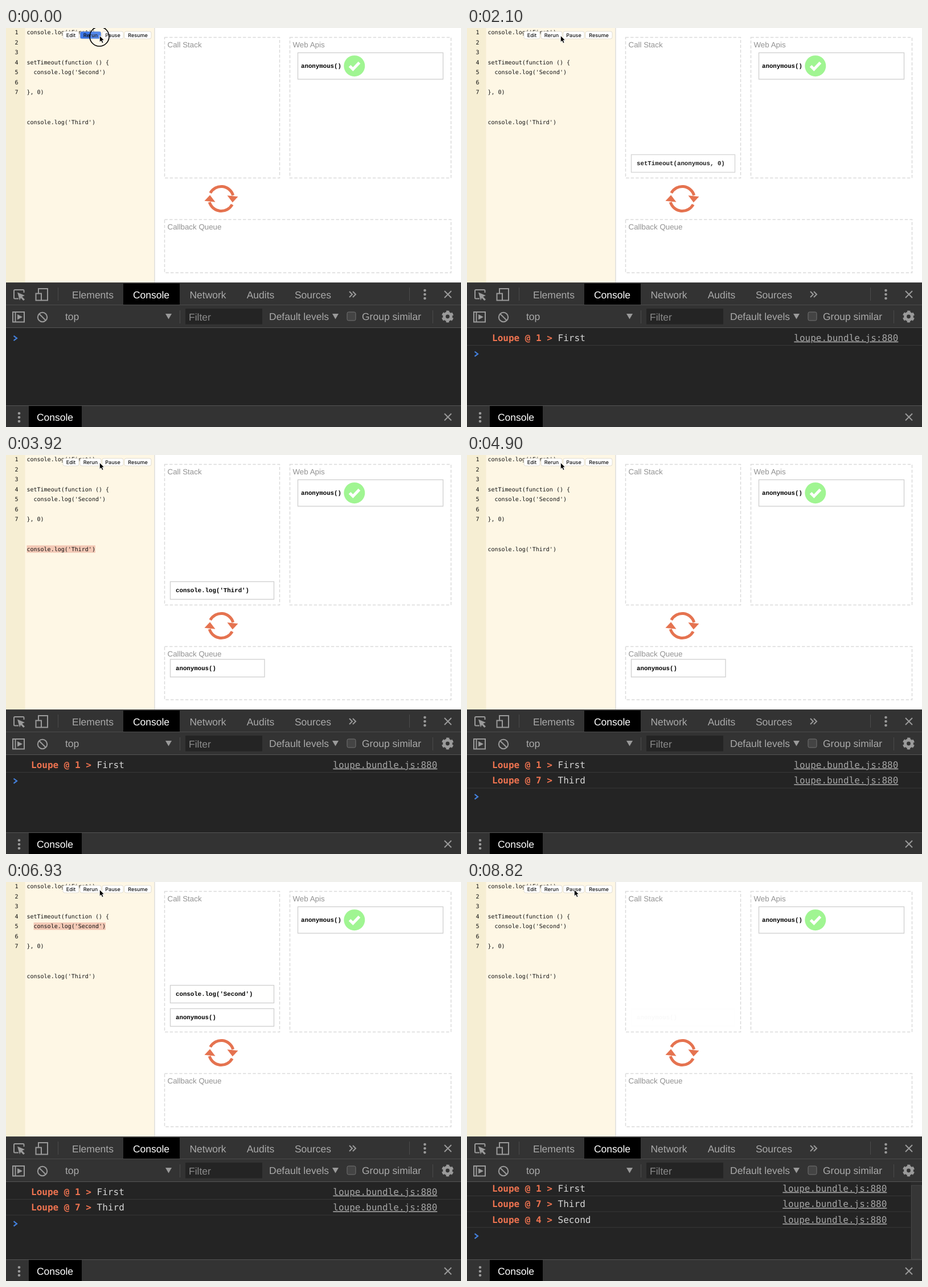
An HTML page that plays this animation: 799 px wide and 701 px high, repeating every 8890 ms.

```html
<!DOCTYPE html>
<html lang="en">
<head>
<meta charset="utf-8">
<title>Event loop</title>
<style>
  html, body { margin: 0; width: 100%; height: 100%; overflow: hidden; background: #fff; }
  svg { display: block; width: 799px; height: 701px; }
  text { white-space: pre; text-rendering: geometricPrecision; }
  .code { font: 10px "DejaVu Sans Mono", monospace; fill: #111; }
  .num { text-anchor: middle; }
  .mark { fill: #f3c9b6; }
  .label { font: 13.35px "Liberation Sans", Arial, sans-serif; fill: #929292; }
  .zone { fill: none; stroke: #dadada; stroke-width: 1.5; stroke-dasharray: 5.4 3.2; }
  .card rect { fill: #fff; stroke: #cecece; stroke-width: 1.3; }
  .card text { font: bold 10.75px "Liberation Mono", "Courier New", monospace; }
  .btn rect { fill: #fff; stroke: #d4d0c6; stroke-width: .7; }
  .btn text { font: 500 9px Inter, sans-serif; text-anchor: middle; fill: #111; }
  .ui { font: 17.5px "Liberation Sans", Arial, sans-serif; fill: #a9a9a9; }
  .dim { fill: #8a8a8a; }
  .mid { text-anchor: middle; }
  .on { fill: #fff; }
  .icon { fill: none; stroke: #9a9a9a; stroke-width: 2; }
  .solid { fill: #9a9a9a; }
  .hub { stroke-width: 5; }
  .teeth { stroke-width: 3; stroke-dasharray: 5.2 4.22; stroke-dashoffset: -2.1; }
  .rule { stroke: #4b4b4b; }
  .log { font: 16px "DejaVu Sans Mono", monospace; fill: #d6d6d6; }
  .tag { font-weight: bold; fill: #ee7350; }
  .link { fill: #a6a6a6; text-decoration: underline; }
</style>
</head>
<body>
<svg viewBox="0 0 799 701">
  <defs>
    <g id="half">
      <path d="M-19.2-10.1A21.7 21.7 0 0 1 20.7-6" fill="none" stroke="#e57350" stroke-width="5"/>
      <path d="M10.5-5.8L29.5-3.8L19.8 6.5Z" fill="#e57350"/>
    </g>
    <path id="close" class="icon" d="M-6-6L6 6M6-6L-6 6"/>
    <g id="dots" class="solid">
      <circle cy="-7" r="2.3"/><circle r="2.3"/><circle cy="7" r="2.3"/>
    </g>
  </defs>

  <rect width="261" height="447" fill="#fef7e5"/>
  <rect width="33.5" height="447" fill="#f6eed3"/>
  <path d="M261 0V447" stroke="#cfcfcf"/>
  <g id="marks"></g>
  <g id="code"></g>
  <g id="buttons"></g>

  <rect class="zone" x="278.5" y="16.5" width="202" height="247"/>
  <rect class="zone" x="498.5" y="16.5" width="283" height="247"/>
  <rect class="zone" x="278.5" y="336.5" width="503" height="93.5"/>
  <text class="label" x="283.5" y="34">Call Stack</text>
  <text class="label" x="503.5" y="34">Web Apis</text>
  <text class="label" x="283.5" y="354">Callback Queue</text>
  <g id="cards"></g>
  <circle cx="611.8" cy="66.7" r="18.5" fill="#a0f592"/>
  <path d="M603.5 66.7L609.3 72.5L620.5 60.7" fill="none" stroke="#fff" stroke-width="5"/>
  <g id="loop"><use href="#half"/><use href="#half" transform="rotate(180)"/></g>

  <rect y="447" width="799" height="254" fill="#333"/>
  <path d="M0 447.5H799" stroke="#484848"/>
  <rect y="527" width="799" height="136" fill="#242424"/>
  <path class="rule" d="M0 486.5H799M91.5 456V479M708.5 456V479M305.5 496V519M749.5 496V519"/>
  <path d="M0 526.5H799M0 663.5H799" stroke="#545454"/>
  <rect x="206" y="449" width="99" height="37"/>
  <rect x="40" y="664" width="93" height="37"/>
  <rect x="315" y="493" width="135" height="27.5" fill="#242424"/>
  <g id="tools"></g>

  <path class="icon" d="M22 475.5H15.5Q14 475.5 14 474V461.5Q14 460 15.5 460H30Q31.5 460 31.5 461.5V465"/>
  <path class="solid" d="M20 464.5L33 470L28.3 472L33 477L30.5 479L26 474.3L24 478.5Z"/>
  <path class="icon" d="M57 466V458H73V478.5H62M52.5 466.5H62V478.5H52.5Z"/>
  <path class="icon" d="M603 463L608 468L603 473M609 463L614 468L609 473"/>
  <use href="#dots" x="735.5" y="468"/>
  <use href="#close" x="776" y="468"/>
  <path class="icon" d="M12 499H32V516.5H12ZM16.5 499V516.5"/>
  <path class="solid" d="M20 503L29 507.7L20 512.5Z"/>
  <circle class="icon" cx="64" cy="508" r="8.2"/>
  <path class="icon" d="M58 502L70 514"/>
  <path class="solid" d="M280 502H291L285.5 511.5ZM573 502H584L578.5 511.5Z"/>
  <rect x="599" y="499" width="15" height="15" rx="2.5" fill="#444" stroke="#727272"/>
  <g transform="translate(775.5 507)">
    <circle class="icon hub" r="5.9"/>
    <circle class="icon teeth" r="9"/>
  </g>
  <use href="#dots" x="23" y="684"/>
  <use href="#close" x="776" y="683.5"/>

  <clipPath id="view"><rect y="527" width="799" height="136"/></clipPath>
  <g clip-path="url(#view)"><g id="scroll">
    <g id="logs"></g>
    <path id="prompt" d="M13.5 540.8L19 545L13.5 549.2" fill="none" stroke="#4480dc" stroke-width="2.2"/>
  </g></g>
  <g id="bar">
    <rect x="779" y="527" width="20" height="136" fill="#2a2a2a"/>
    <rect x="780.5" y="533" width="18" height="129" fill="#363636" stroke="#454545"/>
  </g>

  <circle id="click" cx="164" cy="15" r="17" fill="#fff" fill-opacity=".12" stroke="#000" stroke-width="1.6"/>
  <path id="cursor" d="M0 0V11.6L2.7 9.2L4.5 13.3L6.7 12.3L4.9 8.3H8.4Z" stroke="#fff" stroke-width=".9"/>
</svg>
<script>
const LOOP = 8890, STEP = 70, FADE = 500, CH = 6.02, ROW = 27.7;
const $ = id => document.getElementById(id);

function add(parent, tag, attrs, text) {
  const el = document.createElementNS('http://www.w3.org/2000/svg', tag);
  for (const key in attrs) el.setAttribute(key, attrs[key]);
  if (text) el.textContent = text;
  return parent.appendChild(el);
}

function card(x, y, w, h, pad, text) {
  const g = add($('cards'), 'g', { class: 'card' });
  const box = add(g, 'rect', { x, y, width: w, height: h });
  add(g, 'text', { x: x + pad, y: y + h / 2 + 3.4 }, text);
  return { g, box };
}

// Editor
const lineY = n => 11.2 + 17.5 * (n - 1);
const lines = {
  1: "console.log('First')",
  4: 'setTimeout(function () {',
  5: "  console.log('Second')",
  7: '}, 0)',
  10: "console.log('Third')"
};
for (let n = 1; n <= 7; n++) add($('code'), 'text', { class: 'code num', x: 18.5, y: lineY(n) }, n);
for (const n in lines) add($('code'), 'text', { class: 'code', x: 36.5, y: lineY(n) }, lines[n]);

const buttons = [['Edit', 100, 28], ['Rerun', 130, 37], ['Pause', 169, 37], ['Resume', 208, 47]].map(([name, x, w]) => {
  const g = add($('buttons'), 'g', { class: 'btn' });
  const face = add(g, 'rect', { x, y: 6, width: w, height: 13, rx: 3 });
  add(g, 'text', { x: x + w / 2, y: 16 }, name);
  return face;
});

// Developer tools
for (const [text, x, y, cls] of [
  ['Elements', 152.5, 474.5, 'mid'], ['Console', 255, 474.5, 'mid on'], ['Network', 354.5, 474.5, 'mid'],
  ['Audits', 447, 474.5, 'mid'], ['Sources', 539, 474.5, 'mid'], ['Console', 86, 690, 'mid on'],
  ['top', 104, 513, ''], ['Filter', 321, 513.5, 'dim'],
  ['Default levels', 462, 513, ''], ['Group similar', 625, 513, '']
]) add($('tools'), 'text', { class: 'ui ' + cls, x, y }, text);

// Calls on the stack: text, slot, enter, leave, marked lines
const calls = [
  ["console.log('First')", 0, 300, 1260, [1]],
  ['setTimeout(anonymous, 0)', 0, 1400, 1950, [4, 5, 7]],
  ["console.log('Third')", 0, 3290, 4270, [10]],
  ['anonymous()', 0, 5730, 8325, []],
  ["console.log('Second')", 1, 6440, 7220, [5]]
].map(([text, slot, enter, leave, rows]) => {
  const marks = rows.map(n => {
    const code = lines[n], lead = code.length - code.trimStart().length;
    return add($('marks'), 'rect', {
      class: 'mark', x: 36.5 + lead * CH, y: lineY(n) - 10,
      width: (code.length - lead) * CH, height: 13
    });
  });
  return { ...card(288.5, 222.5 - 41 * slot, 182, 31, 9.5, text), enter, leave, marks };
});
const queued = { ...card(288.5, 359, 165.5, 31, 9.5, 'anonymous()'), enter: 2660, leave: 5730, marks: [] };
card(512.5, 43.5, 255, 46.5, 5.5, 'anonymous()');

// Console output
const logs = [[1, 'First', 1260], [7, 'Third', 4270], [4, 'Second', 7220]].map(([line, word, at], i) => {
  const g = add($('logs'), 'g', { transform: `translate(0 ${i * ROW})` });
  add(g, 'path', { d: 'M0 557.5H799', stroke: '#383838' });
  add(g, 'text', { class: 'log tag', x: 44, y: 549.7 }, `Loupe @ ${line} >`);
  add(g, 'text', { class: 'log', x: 159.6, y: 549.7 }, word);
  const link = add(g, 'text', { class: 'log link', x: 574.3, y: 549.7 }, 'loupe.bundle.js:880');
  return { g, link, at };
});

function bezier(x1, y1, x2, y2) {
  const at = (a, b, s) => 3 * a * s * (1 - s) ** 2 + 3 * b * s * s * (1 - s) + s ** 3;
  return x => {
    let lo = 0, hi = 1;
    for (let i = 0; i < 18; i++) {
      const m = (lo + hi) / 2;
      if (at(x1, x2, m) < x) lo = m; else hi = m;
    }
    return at(y1, y2, lo);
  };
}
const ease = bezier(.25, .1, .25, 1), easeIn = bezier(.42, 0, 1, 1);
const part = (t, from, span) => Math.min(1, Math.max(0, (t - from) / span));
const show = (el, on) => { el.style.display = on ? '' : 'none'; };

function drawCard({ g, box, enter, leave, marks }, t) {
  show(g, t >= enter && t < leave + FADE);
  g.style.opacity = 1 - easeIn(part(t, leave, FADE));
  box.style.fill = `rgb(255 255 ${225 + 30 * part(t, enter, FADE)})`;
  for (const m of marks) show(m, t >= enter && t < leave);
}

function draw(t) {
  for (const c of [...calls, queued]) drawCard(c, t);

  const count = logs.filter(l => t >= l.at).length, full = count === logs.length;
  logs.forEach((l, i) => {
    show(l.g, i < count);
    l.link.setAttribute('x', full ? 554.3 : 574.3);
  });
  $('prompt').setAttribute('transform', `translate(0 ${count * ROW})`);
  $('scroll').setAttribute('transform', `translate(0 ${full ? -6 : 0})`);
  show($('bar'), full);

  const turn = 360 * ease(part(t, 5730, 1000));
  $('loop').setAttribute('transform', `translate(378 300) rotate(${turn})`);

  buttons[1].style.fill = t < 140 ? '#3b76e6' : '';
  show($('click'), t < 210);
  const x = 164.3 + 24 * ease(part(t, 8400, 400));
  $('cursor').setAttribute('transform', `translate(${x} 13.4)`);
}

function tick() {
  const t = performance.now() % LOOP;
  draw(Math.floor(t / STEP) * STEP);
  requestAnimationFrame(tick);
}
tick();
</script>
</body>
</html>
```
